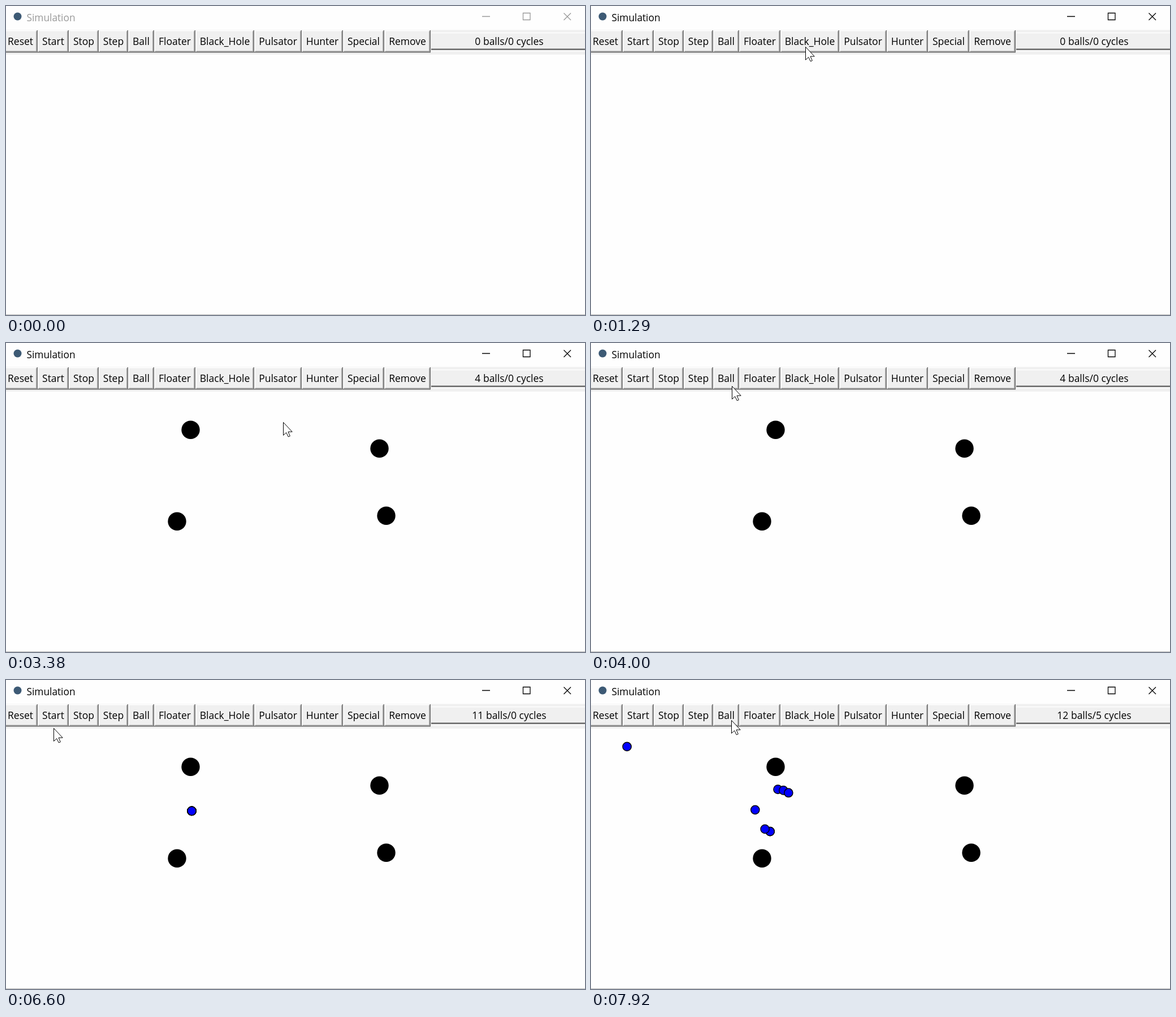
An HTML page that plays this animation: 1024 px wide and 547 px high, repeating every 8000 ms.

```html
<!DOCTYPE html>
<html lang="en">
<head>
<meta charset="utf-8">
<title>Simulation</title>
<style>
  html, body { margin: 0; width: 100%; height: 100%; overflow: hidden; background: #fefefe; }
  svg { display: block; }
  text { font: 17.5px "Open Sans", "Noto Sans", sans-serif; }
  .mid { text-anchor: middle; }
</style>
</head>
<body>
<svg width="1024" height="547" viewBox="0 0 1024 547">
  <rect width="1024" height="547" fill="#fefefe"/>
  <g id="balls"></g>
  <rect width="1024" height="43" fill="#fefefe"/>
  <circle cx="20.5" cy="18.5" r="7" fill="#3d5a75"/>
  <g id="chrome">
    <text x="36.5" y="26.5" style="font-size:17.3px">Simulation</text>
    <path d="M842 18.5h14M914.5 12.5h12.5v12h-12.5zM986.5 12.5l12.5 12.5M999 12.5l-12.5 12.5" fill="none" stroke="currentColor" stroke-width="1.3"/>
  </g>
  <rect y="42.5" width="1024" height="43.5" fill="#f0f0f0"/>
  <g id="buttons" fill="none" stroke-width="1.5"></g>
  <path d="M752 47.5H1024M752 79.5H1024" stroke="#fff" stroke-width="1.5"/>
  <path d="M752 75.5H1024" stroke="#a5a5a5"/>
  <path d="M752 77H1024" stroke="#6c6c6c" stroke-width="2"/>
  <text id="status" class="mid" x="890" y="69"></text>
  <path d="M0 546.5H1024" stroke="#b4b4b4"/>
  <path id="cursor" d="M.5 .5V23.4L5.7 18.6L9.3 26L12.3 24.7L9 17.2H16.2Z" fill="#fff" stroke="#000"/>
</svg>
<script>
const LOOP = 8000, FRAME = 77, FIRST_CYCLE = 7430, CYCLE = 120, SPEED = 7.65;
const LEFT = -5, RIGHT = 751;
const $ = id => document.getElementById(id);

function set(el, attrs) {
  for (const key in attrs) el.setAttribute(key, attrs[key]);
}
function add(parent, tag, attrs, text = '') {
  const el = document.createElementNS('http://www.w3.org/2000/svg', tag);
  set(el, attrs);
  el.textContent = text;
  return parent.appendChild(el);
}

// Cursor moves: first step, last step, destination, height of the arc
const moves = [
  [130, 130, 645, 416],
  [210, 590, 413, 93],
  [890, 1130, 379, 72],
  [1440, 1670, 326, 153],
  [1840, 2140, 302, 315],
  [2370, 2620, 672, 305, 55],
  [2920, 3150, 660, 186],
  [3380, 3920, 249, 76],
  [4230, 4310, 328, 231],
  [6160, 6600, 84, 85],
  [7080, 7170, 80, 70],
  [7580, 7920, 248, 71]
];
const presses = [1210, 3920, 7260];
const clicks = [1840, 2220, 2770, 3380, 4540, 4690, 4920, 5090, 5240, 5470, 5850, 6840];
const HOLES = 4;
const turns = [13, 13, 14, 0, 1, 2, -6, 14];  // headings in steps of 15 degrees

function cursorAt(t) {
  let x = 0, y = 0;
  for (const [start, end, toX, toY, arc = 0] of moves) {
    if (t < start) break;
    const steps = Math.round((end - start) / FRAME) + 1;
    const step = Math.min(steps, Math.floor((t - start) / FRAME + 1.15));
    const ease = 1 - (1 - step / steps) ** 4;
    x += (toX - x) * ease;
    y += (toY - y) * ease - 4 * arc * ease * (1 - ease);
  }
  return [Math.round(x), Math.round(y)];
}

// Buttons are as wide as their labels plus an equal share of the spare room
const labels = 'Reset Start Stop Step Ball Floater Black_Hole Pulsator Hunter Special Remove'
  .split(' ').map(name => add($('buttons'), 'text', { class: 'mid', fill: '#000' }, name));
const widths = labels.map(label => label.getComputedTextLength());
const pad = (RIGHT - LEFT - widths.reduce((a, b) => a + b)) / labels.length;
let edge = LEFT;

const buttons = labels.map((label, i) => {
  const x = Math.round(edge), r = Math.round(edge += widths[i] + pad);
  const line = d => add($('buttons'), 'path', { d });
  set(label, { x: (x + r) / 2, y: 69 });
  return {
    x, r, label,
    light: line(`M${x + .75} 81V43.75H${r - 1.5}`),
    shade: line(`M${x + 1.5} 80.25H${r - 2.25}V44.5`),
    dark: line(`M${x} 81.75H${r - .75}V43`)
  };
});

// Every click on the canvas leaves a ball under the cursor
const balls = clicks.map((born, i) => {
  const [x, y] = cursorAt(born - 1);
  const hole = i < HOLES, angle = hole ? 0 : (turns[i - HOLES] * 15 - 87) * Math.PI / 180;
  const speed = hole ? 0 : SPEED;
  const el = add($('balls'), 'circle', hole
    ? { r: 16.2 }
    : { r: 7.6, fill: '#00f', stroke: '#000', 'stroke-width': 1.5 });
  return { el, born, x: x + .5, y: y + .8, vx: speed * Math.cos(angle), vy: speed * Math.sin(angle) };
});

function draw(t) {
  const [x, y] = cursorAt(t);
  set($('cursor'), { transform: `translate(${x} ${y})`, visibility: t < moves[0][0] ? 'hidden' : 'visible' });

  const cycles = Math.max(0, Math.floor((t - FIRST_CYCLE) / CYCLE) + 1);
  for (const b of balls) {
    set(b.el, {
      cx: b.x + b.vx * cycles,
      cy: b.y + b.vy * cycles,
      visibility: t < b.born ? 'hidden' : 'visible'
    });
  }
  $('status').textContent = `${clicks.filter(c => c <= t).length} balls/${cycles} cycles`;

  const pressing = presses.some(p => t >= p && t < p + 80);
  for (const b of buttons) {
    const down = pressing && x >= b.x && x < b.r;
    set(b.light, { stroke: down ? '#6c6c6c' : '#fff' });
    set(b.shade, { stroke: down ? '#e3e3e3' : '#a5a5a5' });
    set(b.dark, { stroke: down ? '#fff' : '#6c6c6c' });
    set(b.label, { transform: down ? 'translate(1.5 1.5)' : '' });
  }

  const ink = t < presses[0] ? '#999' : '#000';
  set($('chrome'), { fill: ink, color: ink });
}

const began = performance.now();
function tick() {
  draw((performance.now() - began) % LOOP);
  requestAnimationFrame(tick);
}
tick();
</script>
</body>
</html>
```
